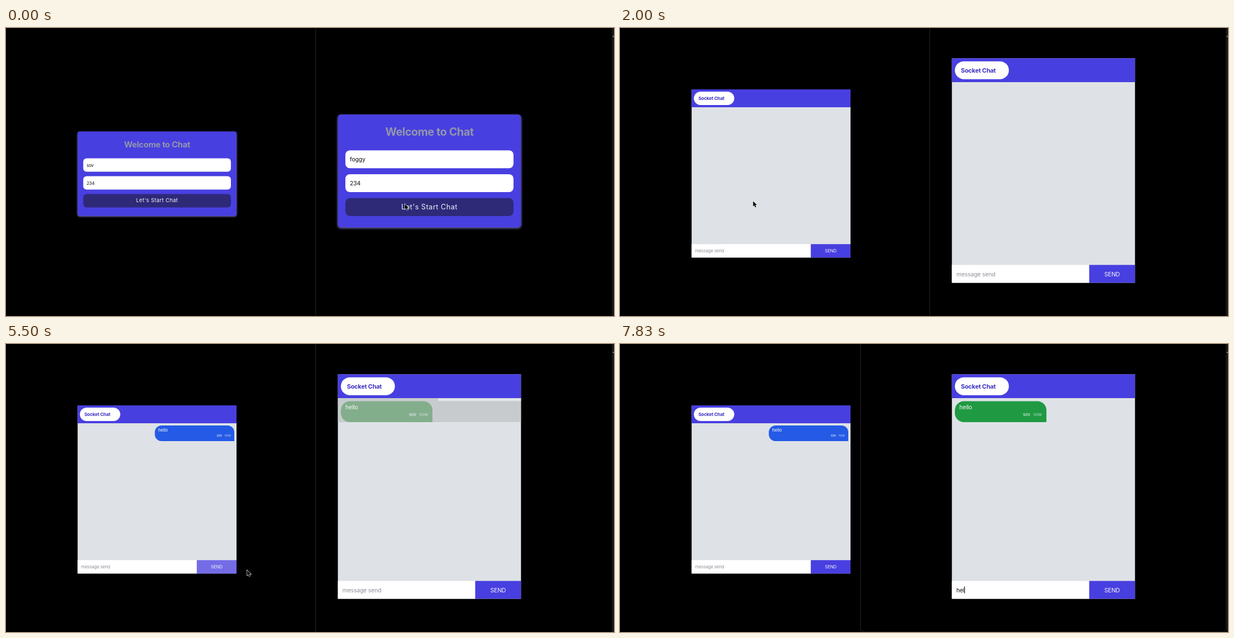
An HTML page with a canvas for the animation above (8 s loop, 1084 by 516 pixels).

```html
<!DOCTYPE html>
<html lang="en">
<head>
<meta charset="utf-8">
<title>Two chat windows</title>
<style>
  html, body { margin: 0; width: 100%; height: 100%; overflow: hidden; background: #000; }
  canvas { display: block; }
</style>
</head>
<body>
<canvas id="stage" width="1084" height="516"></canvas>
<script>
const ctx = document.getElementById('stage').getContext('2d');
const LOOP = 8000, STEPS_PER_SECOND = 6;
const INDIGO = '#483fe0', BODY = '#dee2e6', GREEN = '#1f9a43', BLUE = '#245ae6';

// rem is the size of one root unit in each browser window.
const left = { x: 127.7, w: 283.3, rem: 8, cardY: 185.5, chatY: 110, chatH: 301.3, user: 'sov' };
const right = { x: 591.7, w: 326.5, rem: 10.7, cardY: 155, chatY: 54.3, chatH: 402.2, user: 'foggy' };

// Mouse path: step, x, y
const PATH = [
  [0, 710.5, 315], [5, 707, 322.5], [7, 690, 321], [9, 245, 309], [12, 237, 310],
  [15, 235, 330], [17, 200, 398], [21, 200, 398], [23, 240, 440], [26, 372, 401],
  [31, 374, 402], [33, 429.5, 405], [36, 640, 330], [38, 689, 438], [48, 689, 438]
];

function rect(x, y, w, h, color, radius = 0) {
  ctx.fillStyle = color;
  ctx.beginPath();
  ctx.roundRect(x, y, w, h, radius);
  ctx.fill();
}

// Draws a line of text whose capitals are centred on y; returns its width.
function text(str, x, y, size, color, { weight = 400, align = 'left', spacing = -0.02 } = {}) {
  const px = size * 0.98;
  ctx.font = `${weight} ${px}px Inter, sans-serif`;
  ctx.letterSpacing = `${spacing * px}px`;
  ctx.textAlign = align;
  ctx.fillStyle = color;
  ctx.fillText(str, x, y + px * 0.36);
  return ctx.measureText(str).width;
}

function login({ x, w, rem, cardY: y, user }) {
  const fieldX = x + 1.25 * rem, fieldW = w - 2.5 * rem;
  ctx.save();
  ctx.shadowColor = 'rgba(135, 130, 205, .9)';
  ctx.shadowBlur = 0.4 * rem;
  ctx.shadowOffsetY = 0.13 * rem;
  rect(x, y, w, 18.9 * rem, INDIGO, 0.5 * rem);
  ctx.restore();
  text('Welcome to Chat', x + w / 2, y + 2.93 * rem, 1.875 * rem, '#9297a9', { weight: 700, align: 'center' });
  [user, '234'].forEach((value, i) => {
    const top = y + (6 + 4 * i) * rem;
    rect(fieldX, top, fieldW, 3 * rem, '#fff', 0.75 * rem);
    text(value, fieldX + 0.75 * rem, top + 1.53 * rem, rem, '#111');
  });
  rect(fieldX, y + 14 * rem, fieldW, 3 * rem, '#2e2a78', 0.75 * rem);
  text("Let's Start Chat", x + w / 2, y + 15.45 * rem, 1.2 * rem, '#f4f4fa', { align: 'center', spacing: 0.04 });
}

function bubble({ rem, w, chatY }, x, color, paintOver) {
  const y = chatY + 4.5 * rem, width = w / 2, r = 1.5 * rem, end = x + width;
  rect(x, y, width, 3.5 * rem, color, [r, r, 0, r]);
  paintOver?.();
  const metaY = y + 2.22 * rem;
  text('hello', x + 0.75 * rem, y + 1.03 * rem, rem, '#f5f8f6');
  text(left.user, end - 2.72 * rem, metaY, 0.75 * rem, '#f2f5f3', { align: 'right' });
  text('now', end - 0.75 * rem, metaY, 0.75 * rem, 'rgba(235, 238, 242, .72)', { align: 'right' });
}

function chat({ x, w, rem, chatY: y, chatH: h }, { typed, caret, sendColor = INDIGO }) {
  const footerY = y + h - 3 * rem, middle = footerY + 1.53 * rem, inputX = x + 0.75 * rem;
  rect(x, y, w, h, BODY);
  rect(x, y, w, 4 * rem, INDIGO);
  rect(x + 0.5 * rem, y + 0.5 * rem, 9 * rem, 3 * rem, '#fff', 1.5 * rem);
  text('Socket Chat', x + 1.5 * rem, y + 2.03 * rem, 1.04 * rem, '#3d32c4', { weight: 700 });

  rect(x, footerY, w * 0.75, 3 * rem, '#fff');
  rect(x + w * 0.75, footerY, w * 0.25, 3 * rem, sendColor);
  text('SEND', x + w * 0.875, middle, rem, '#f6f6fd', { align: 'center' });
  const width = text(typed || 'message send', inputX, middle, rem, typed ? '#111' : '#8e9199');
  if (caret) rect(inputX + (typed ? width : 0), middle - 0.6 * rem, 1, 1.15 * rem, '#111');
}

function selection() {
  const { x, w } = right, tint = 'rgba(123, 180, 253, .64)';
  rect(605, 107, x + w - 605, 12, tint);
  rect(x, 119, w, 246, tint);
  rect(718, 121.5, 13.5, 11, 'rgba(115, 175, 240, .6)');
  rect(736.5, 121.5, 15.5, 11, 'rgba(115, 175, 240, .6)');
}

function windows(rightInFront) {
  ctx.strokeStyle = '#262626';
  ctx.lineWidth = 1;
  ctx.beginPath();
  if (rightInFront) {
    ctx.roundRect(428.7, -10, 652, 526, 7);
  } else {
    ctx.moveTo(552, 0);
    ctx.lineTo(552, 516);
    ctx.moveTo(1080.7, 0);
    ctx.lineTo(1080.7, 516);
  }
  ctx.stroke();
  rect(1081.5, 0, 2.5, 516, '#181a1a');
  rect(1081.5, 14, 2.5, 2, '#777');
}

function pointer(step) {
  const i = PATH.findIndex(([s]) => s > step);
  const [s0, x0, y0] = PATH[i - 1], [s1, x1, y1] = PATH[i];
  const k = (step - s0) / (s1 - s0);
  ctx.save();
  ctx.translate(x0 + (x1 - x0) * k, y0 + (y1 - y0) * k);
  if (step === 38) {
    ctx.strokeStyle = '#111';
    ctx.lineWidth = 1.4;
    ctx.beginPath();
    ctx.arc(0, 0, 14.5, 0, 7);
    ctx.stroke();
  }
  const arrow = new Path2D('M.4 .4V9.6L2.5 7.7 4 11.2 5.7 10.5 4.2 7.1H7.1Z');
  ctx.strokeStyle = '#e8e8e8';
  ctx.lineWidth = 1.3;
  ctx.stroke(arrow);
  ctx.fillStyle = '#000';
  ctx.fill(arrow);
  ctx.restore();
}

const between = (step, from, to) => step >= from && step < to;
const typing = (step, start) => 'hello'.slice(0, Math.max(0, step - start + 1));

function draw(step) {
  rect(0, 0, 1084, 516, '#000');
  windows(between(step, 2, 9) || step >= 35);

  if (step < 10) {
    login(left);
  } else {
    chat(left, {
      typed: step < 29 ? typing(step, 20) : '',
      caret: between(step, 17, 29),
      sendColor: between(step, 26, 34) ? '#736ce6' : INDIGO
    });
    if (step >= 29) bubble(left, left.x + left.w / 2 - 0.5 * left.rem, BLUE);
  }

  if (step < 3) {
    login(right);
  } else {
    chat(right, { typed: typing(step, 45), caret: step >= 39 });
    const bubbleX = right.x + 0.5 * right.rem;
    if (between(step, 32, 34)) {
      rect(right.x, 97, right.w, 43, '#c8cbce');
      rect(771, 97, right.x + right.w - 771, 5.3, '#e0e5e6');
      ctx.save();
      bubble(right, bubbleX, '#83ae8c');
      ctx.restore();
    } else if (step >= 34) {
      bubble(right, bubbleX, GREEN, between(step, 37, 40) ? selection : null);
    }
  }

  const hidden = between(step, 19, 23) || step >= 44;
  if (!hidden) pointer(step);
}

function tick() {
  const ms = performance.now() % LOOP;
  draw(Math.min(47, Math.floor((ms + 5) * STEPS_PER_SECOND / 1000)));
  requestAnimationFrame(tick);
}
tick();
</script>
</body>
</html>
```
